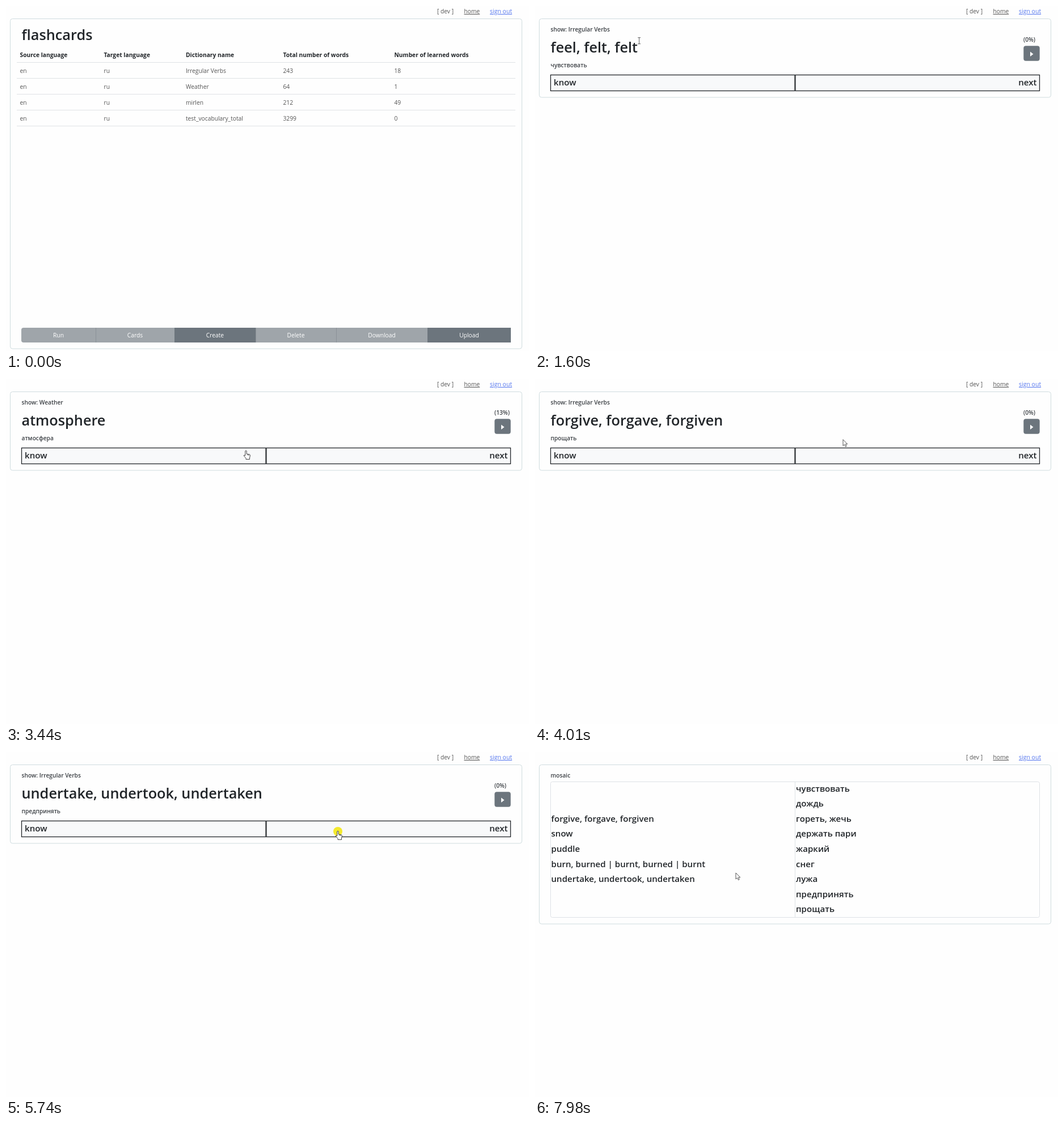
These frames come from a looping animation (922x608 px, 8 s). An HTML page:

```html
<!DOCTYPE html>
<html lang="en">
<head>
<meta charset="utf-8">
<title>flashcards</title>
<style>
  html, body { margin: 0; width: 100%; height: 100%; overflow: hidden; background: #fefefe; }
  svg { display: block; width: 922px; height: 608px; font: 10.25px "Open Sans", "Noto Sans", sans-serif; }
  text { fill: #555; white-space: pre; }
  .th { font-weight: 700; fill: #212529; }
  .h1, .h4, .h6 { font-weight: 600; fill: #212529; }
  .h1 { font-size: 25.3px; }
  .h4 { font-size: 15.1px; }
  .h6 { font-size: 10.2px; fill: #3c4045; }
  .btn { fill: #fff; text-anchor: middle; }
  .link { text-decoration: underline; }
  .out { fill: #5677ee; font-size: 10.5px; }
  .end { text-anchor: end; }
</style>
</head>
<body>
<svg id="stage" viewBox="0 0 922 608"></svg>
<script>
const LOOP = 8000, GRAY = '#6c757d', PALE = '#9fa5aa';
const ROW_AT = [520, 980], RUN_AT = 1270, MOSAIC_AT = 7510;
const GLIDE = 450, PRESS = 250, LOCK = 60;

const columns = [24.5, 172.5, 317, 488.5, 684.5];
const heads = ['Source language', 'Target language', 'Dictionary name',
  'Total number of words', 'Number of learned words'];
const rows = [
  ['en', 'ru', 'Irregular Verbs', '243', '18'],
  ['en', 'ru', 'Weather', '64', '1'],
  ['en', 'ru', 'mirlen', '212', '49'],
  ['en', 'ru', 'test_vocabulary_total', '3299', '0']
];
const labels = ['Run', 'Cards', 'Create', 'Delete', 'Download', 'Upload'];
const edges = [27, 158, 297, 440, 582, 743, 890];
const alwaysOn = ['Create', 'Upload'];

const V = 'Irregular Verbs', W = 'Weather';
// start, dictionary, word, translation, percent, examples
const cards = [
  [RUN_AT, V, 'feel, felt, felt', 'чувствовать', 0],
  [2110, V, 'bet, bet, bet', 'держать пари', 0],
  [2800, W, 'atmosphere', 'атмосфера', 13],
  [3720, V, 'forgive, forgave, forgiven', 'прощать', 0],
  [4620, W, 'hot', 'жаркий', 0, 'hot weather (жаркая погода), It is hot. (Жарко.)'],
  [4870, V, 'undertake, undertook, undertaken', 'предпринять', 0],
  [5970, W, 'puddle', 'лужа', 0],
  [6350, W, 'snow', 'снег', 13,
    'It snows. (Идёт снег.), heavy snow (сильный снегопад), snow depth (высота снежного покрова)'],
  [6720, W, 'rain', 'дождь', 20, 'It rains., heavy rain, drizzling rain, torrential rain'],
  [7150, V, 'burn, burned | burnt, burned | burnt', 'гореть, жечь', 0]
];
const english = ['forgive, forgave, forgiven', 'snow', 'puddle',
  'burn, burned | burnt, burned | burnt', 'undertake, undertook, undertaken'];
const russian = ['чувствовать', 'дождь', 'гореть, жечь', 'держать пари', 'жаркий',
  'снег', 'лужа', 'предпринять', 'прощать'];

// pointer stops: arrival time, x, y
const stops = [[70, 650, 430], [480, 229, 116], [960, 300, 137], [1220, 87, 577],
  [1440, 345, 122], [1590, 183, 61], [1980, 485, 126], [2600, 590, 132], [3400, 423, 126],
  [4110, 560, 104], [4370, 594, 132], [4690, 589, 143], [5590, 585, 139], [7980, 354, 213]];

const text = (x, y, s, cls = '') => `<text x="${x}" y="${y}" class="${cls}">${s}</text>`;
const box = (x, y, w, h, fill, stroke = 'none', r = 0, sw = 1) =>
  `<rect x="${x}" y="${y}" width="${w}" height="${h}" rx="${r}" fill="${fill}" stroke="${stroke}" stroke-width="${sw}"/>`;
const line = (d, color) => `<path d="${d}" stroke="${color}" fill="none"/>`;
const panel = bottom => box(7.5, 22.5, 902, bottom - 22.5, '#fefefe', '#cfdcdf', 4);
const list = (words, x, y) => words.map((w, i) => text(x, y + 26.6 * i, w, 'h4')).join('');

// Each glide ends at its stop; the pointer rests in between.
function pointerAt(t) {
  const i = stops.findIndex(s => s[0] > t);
  if (i < 0) return stops[stops.length - 1].slice(1);
  if (!i) return null;
  const [t0, x0, y0] = stops[i - 1], [t1, x1, y1] = stops[i];
  const k = Math.max(0, 1 - (t1 - t) / Math.min(GLIDE, t1 - t0));
  const e = k * k * (3 - 2 * k);
  return [x0 + (x1 - x0) * e, y0 + (y1 - y0) * e];
}

function tableView(t) {
  let s = panel(604) + text(27.5, 60, 'flashcards', 'h1');
  heads.forEach((h, i) => s += text(columns[i], 89.5, h, 'th'));
  rows.forEach((row, r) => {
    const y = 99.5 + 28 * r;
    if (t >= ROW_AT[r]) s += box(19, y, 879, 28, '#d1e7dd');
    row.forEach((c, i) => s += text(columns[i], y + 18.2, c));
  });
  for (let r = 0; r < 5; r++) s += line(`M19 ${99.5 + 28 * r}H898`, '#dfe2e5');
  labels.forEach((label, i) => {
    const left = edges[i], right = edges[i + 1];
    const on = t >= ROW_AT[0] || alwaysOn.includes(label), fill = on ? GRAY : PALE;
    s += box(left, 567, right - left, 26, fill, 'none', i ? 0 : 4);
    if (!i) s += box(left + 9, 567, right - left - 9, 26, fill);
    else if (!on) s += line(`M${left + .5} 567V593`, '#8b9298');
    s += text((left + right) / 2, 584, label, 'btn');
  });
  return s;
}

function cardView(t, [start, dict, word, meaning, percent, examples], top) {
  const half = x => box(x, top + .5, 430.5, 28, '#f8f9fa', '#212529', 0, 1.3);
  return panel(top + 40)
    + text(27.5, 44.5, 'show: ' + dict, 'h6') + text(27.5, 82.3, word, 'h1')
    + text(27.5, 107.5, meaning, 'h6') + (examples ? text(27.5, 126.5, examples, 'h6') : '')
    + text(861, 63, `(${percent}%)`, 'h6')
    + box(861.3, 70.3, 28.4, 26.4, t < start + LOCK ? PALE : GRAY, 'none', 4)
    + '<path d="M873 80.5V89L878.5 84.75Z" fill="#fff"/>'
    + half(27.5) + half(459)
    + text(33, top + 18.5, 'know', 'h4') + text(884.5, top + 18.5, 'next', 'h4 end');
}

function mosaicView() {
  return panel(303) + text(27.5, 44.5, 'mosaic', 'h6')
    + box(27.5, 52.5, 862, 239, 'none', '#dee2e6', 3) + line('M458.5 52.5V291.5', '#dee2e6')
    + list(english, 28.5, 122.8) + list(russian, 460, 69.5);
}

const shapes = {
  arrow: '<path d="M0 0V11L2.6 8.8L4.4 12.6L6.2 11.8L4.5 8H7.8Z" fill="#fff" stroke="#444" stroke-width=".9"/>',
  hand: '<path d="M-1.2 9V1Q0-.9 1.2 1V6L6.5 7Q7.6 7.4 7.4 9L6.5 13V15.5H0V13.5L-4 9Q-3.6 7.2-1.2 9ZM3 6.5V8.5M5 7V9" fill="#fff" stroke="#333" stroke-width=".9"/>',
  beam: '<path d="M-2.5-5.5H2.5M0-5.5V5.5M-2.5 5.5H2.5" fill="none" stroke="#555" stroke-width=".9"/>'
};

// A yellow dot marks the press that leads to the next card.
function pointerView(t, kind, [x, y]) {
  const pressed = kind == 'hand' && cards.some(([start]) => t < start && start - t <= PRESS);
  const dot = pressed ? '<circle cy="1" r="8" fill="#f3e92c"/>' : '';
  return `<g transform="translate(${x.toFixed(1)} ${y.toFixed(1)})">${dot}${shapes[kind]}</g>`;
}

function render(t) {
  const pos = pointerAt(t), [x, y] = pos || [0, 0];
  let kind = 'arrow', view;
  if (t < RUN_AT) {
    view = tableView(t);
    if (y > 567 && y < 593) kind = 'hand';
  } else if (t < MOSAIC_AT) {
    const card = cards.filter(c => c[0] <= t).pop(), top = card[5] ? 134 : 121;
    view = cardView(t, card, top);
    if (y >= top && y < top + 29) kind = 'hand';
    else if (y < 90 && x < 200) kind = 'beam';
  } else view = mosaicView();
  stage.innerHTML = text(760, 13, '[ dev ]') + text(807.5, 13, 'home', 'link')
    + text(853, 13, 'sign out', 'link out') + view + (pos ? pointerView(t, kind, pos) : '');
}

const stage = document.getElementById('stage'), begin = performance.now();
function tick() {
  render((performance.now() - begin) % LOOP);
  requestAnimationFrame(tick);
}
tick();
</script>
</body>
</html>
```
